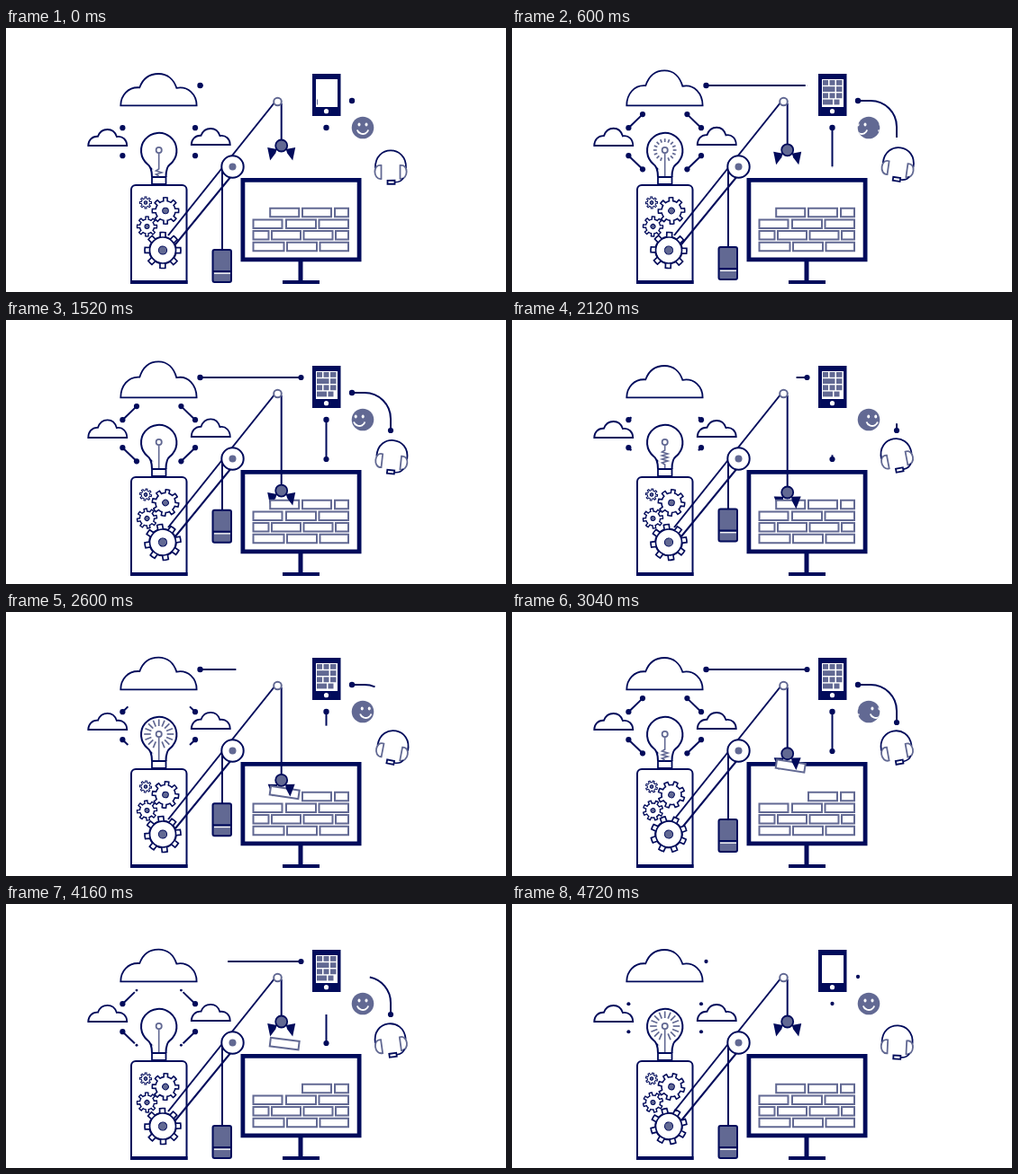
An HTML page with a canvas that plays this animation: 555 by 294 pixels, repeating every 4.76 s.

```html
<!DOCTYPE html>
<html lang="en">
<head>
<meta charset="utf-8">
<title>Idea machine</title>
<style>
  html, body { margin: 0; height: 100%; overflow: hidden; background: #fff; }
  canvas { display: block; }
</style>
</head>
<body>
<canvas id="stage" width="555" height="294"></canvas>
<script>
const c = document.getElementById('stage').getContext('2d');
const NAVY = '#010b5b', SLATE = '#626993', WHITE = '#fff';
const LOOP = 4760, TAU = Math.PI * 2;

const ramp = (t, a, b) => Math.min(1, Math.max(0, (t - a) / (b - a)));
const smooth = (t, a, b) => { const x = ramp(t, a, b); return x * x * (3 - 2 * x); };
const cubic = (t, a, b) => {
  const x = ramp(t, a, b);
  return x < .5 ? 4 * x ** 3 : 1 - 4 * (1 - x) ** 3;
};

function paint(fill, stroke, width = 2) {
  if (fill) { c.fillStyle = fill; c.fill(); }
  if (stroke) { c.strokeStyle = stroke; c.lineWidth = width; c.stroke(); }
}
function line(points, color = NAVY, width = 2) {
  c.beginPath();
  points.forEach(p => c.lineTo(...p));
  paint(null, color, width);
}
function circle(x, y, r, fill, stroke, width) {
  c.beginPath();
  c.arc(x, y, r, 0, TAU);
  paint(fill, stroke, width);
}
function box(x, y, w, h, fill, stroke, width, radius = 0) {
  c.beginPath();
  c.roundRect(x, y, w, h, radius);
  paint(fill, stroke, width);
}
function at(x, y, angle, draw) {
  c.save();
  c.translate(x, y);
  c.rotate(angle);
  draw();
  c.restore();
}

function cloud(x, base, size, puff) {
  const stretch = size * (1 + puff);
  const p = new Path2D();
  p.addPath(new Path2D('M-42 0C-42 -11 -34 -21 -21 -20C-17 -31 -9 -35.3 0 -35.3C10 -35.3 17 -29 20 -19.5C33 -22 42.3 -12 42.3 0Z'),
    new DOMMatrix([size, 0, 0, stretch, x, base]));
  c.strokeStyle = NAVY;
  c.lineWidth = 1.8;
  c.stroke(p);
}

function gear(x, y, body, tip, hub, teeth, angle, width) {
  at(x, y, angle, () => {
    c.beginPath();
    for (let i = 0; i < teeth; i++) {
      const mid = i * TAU / teeth, half = TAU / teeth / 4;
      c.arc(0, 0, body, mid - half * 3, mid - half);
      c.arc(0, 0, tip, mid - half * .75, mid + half * .75);
      c.lineTo(body * Math.cos(mid + half), body * Math.sin(mid + half));
    }
    c.closePath();
    paint(WHITE, NAVY, width);
    if (tip > 18) circle(0, 0, body - .5, null, NAVY, width);
    circle(0, 0, hub, SLATE, NAVY, 1);
  });
}

// Wire drawn between fractions a and b of its length
function wire(points, a, b) {
  if (b <= a) return;
  const [[x0, y0], [x1, y1]] = points;
  const bend = x0 !== x1 && x0 > 380, r = 29;
  const length = bend ? x1 - x0 + y1 - y0 - 2 * r + r * TAU / 4 : Math.hypot(x1 - x0, y1 - y0);
  c.save();
  c.setLineDash([(b - a) * length, 999]);
  c.lineDashOffset = -a * length;
  c.beginPath();
  c.moveTo(x0, y0);
  if (bend) c.arcTo(x1, y0, x1, y1, r);
  c.lineTo(x1, y1);
  paint(null, NAVY, 2);
  c.restore();
}
// Dot that pops in and out within a window of the cycle
function dot([x, y], q, from, to, r = 3.1) {
  const k = Math.min(ramp(q, from, from + .025), 1 - ramp(q, to - .025, to));
  if (k > 0) circle(x, y, r * k, NAVY);
}

function wires(q) {
  const longEnd = smooth(q, -.03, .275), longStart = smooth(q, .64, .955);
  const long = [[[215.5, 64], [327.5, 64]], [[384, 81], [427, 123]], [[355.5, 111], [355.5, 155]]];
  for (const ends of long) {
    wire(ends, longStart, longEnd);
    dot(ends[0], q, -.033, .7, 3.2);
    dot(ends[0], q, .967, 1.7, 3.2);
    dot(ends[1], q, .25, .975);
  }
  const start = smooth(q, .3, .51) - smooth(q, .53, .635);
  const end = smooth(q, 0, .22) - smooth(q, .68, .975);
  for (const sx of [-1, 1]) for (const sy of [-1, 1]) {
    const outer = [169.7 + sx * 40.3, 126.7 + sy * 15.5];
    const inner = [169.7 + sx * 24.7, 126.7 + sy * 30.6];
    wire([outer, inner], start, end);
    dot(outer, q, -.033, .4);
    dot(outer, q, .57, .975);
    dot(outer, q, .967, 1.5);
    dot(inner, q, .18, .76, 3.1 + start);
  }
}

function bulb(p) {
  c.beginPath();
  c.moveTo(162, 166);
  c.bezierCurveTo(162, 158, 160.5, 154, 157, 151.5);
  c.arc(169.7, 136.5, 19.7, Math.PI * .72, Math.PI * .28);
  c.bezierCurveTo(179, 154, 177.5, 158, 177.5, 166);
  paint(WHITE, NAVY);
  box(162, 166, 15.5, 8, WHITE, NAVY, 1.8);

  const k = ramp(p, .17, .27) ** 2;
  const mid = 161 - 24 * k, half = 4 + 17 * k * (1 - k);
  const stem = [];
  for (let y = 139; y <= 165; y += 2) {
    const shaking = p < .27 && Math.abs(y - mid) < half;
    stem.push([169.7 + (shaking ? (y % 4 < 2 ? 3.2 : -3.2) : 0), y]);
  }
  line(stem, SLATE, 1.6);
  circle(169.7, 136, 3.1, WHITE, SLATE, 1.8);

  const glow = ramp(p, .6, .72);
  if (glow) for (let i = 0; i < 16; i++) {
    if (i === 8) continue;
    const a = i * TAU / 16, s = Math.sin(a), o = -Math.cos(a), tip = 9 + 7.5 * Math.sqrt(glow);
    line([[169.7 + 9 * s, 136 + 9 * o], [169.7 + tip * s, 136 + tip * o]], SLATE, 1.7);
  }
}

function phone(p) {
  box(340, 51, 31.5, 47, NAVY);
  box(344, 57, 24, 31, WHITE);
  circle(355.5, 92.7, 2.6, WHITE);
  const tiles = [
    [345, 3, 11], [345, 2, 6], [352.5, 2, 6], [360, 2, 6.5], [345, 1, 13.5], [360, 1, 6.5],
    [345, 0, 6], [352.5, 0, 6], [360, 0, 6.5], [357.5, 3, 6]
  ];
  if (p < .965) tiles.forEach(([x, row, w], i) => {
    const grown = w * ramp(p, i * .03 - .004, i * .03 + .045);
    if (grown) box(x, 58 + row * 7.2, grown, 5.8, SLATE);
  });
}

function face(p) {
  c.save();
  circle(396, 111, 12.3, SLATE);
  c.clip();
  const turn = 25 * smooth(p, .07, .58);
  for (const x of [396 - turn, 421 - turn]) {
    for (const side of [-4, 4]) {
      c.beginPath();
      c.ellipse(x + side, 107.5, 1.5, 2, 0, 0, TAU);
      paint(WHITE);
    }
    c.beginPath();
    c.arc(x, 111.5, 6.5, .1 * Math.PI, .9 * Math.PI);
    paint(null, WHITE, 1.9);
  }
  c.restore();
}

function headset(p) {
  const swing = -Math.sin(p * TAU), lift = Math.abs(swing);
  at(427 + swing * 1.2 + lift, 156 - 4.5 * lift, swing * .19, () => {
    c.beginPath();
    c.moveTo(-17, 0);
    c.bezierCurveTo(-18, -26, 18, -26, 17, 0);
    paint(null, NAVY, 1.8);
    for (const s of [-1, 1]) {
      c.beginPath();
      c.moveTo(s * 10.5, -3);
      c.bezierCurveTo(s * 20, -5, s * 20, 13, s * 10.5, 12);
      c.closePath();
      paint(WHITE, SLATE, 1.8);
    }
    c.beginPath();
    c.moveTo(14, 11);
    c.quadraticCurveTo(12, 15.5, 5, 15.8);
    paint(null, NAVY, 1.6);
    box(-3.5, 13.8, 8, 4, WHITE, NAVY, 1.8);
  });
}

const brick = (x, y, w) => box(x, y, w, 9.5, WHITE, SLATE, 2);

function monitor() {
  line([[327, 259], [327, 283]], NAVY, 5);
  line([[307, 283], [348, 283]], NAVY, 4);
  box(262.9, 169.4, 129.2, 88.4, WHITE, NAVY, 4.8);
  const rows = [
    [[329, 32], [365, 15]],
    [[274.5, 32], [311, 33], [347.5, 32.5]],
    [[274.5, 17], [295, 32], [330.5, 32], [366, 14]],
    [[274.5, 34], [312, 33], [348.5, 31.5]]
  ];
  rows.forEach((row, i) => row.forEach(([x, w]) => brick(x, 200.7 + i * 12.7, w)));
}

function crane(t) {
  const drop = cubic(t, 130, 1870) - cubic(t, 2134, 3874);
  const y = 131 + 61 * drop, weight = 247 - 36.5 * drop;

  line([[180, 231], [298.5, 82.5]]);
  line([[188, 241], [250, 165]]);
  line([[240, 157], [240, weight]]);
  box(229.5, weight, 20.5, 36, SLATE, NAVY, 2, 2);
  line([[230, weight + 24], [250, weight + 24]], NAVY, 2);
  line([[231, weight + 26.2], [249, weight + 26.2]], WHITE, 1.3);
  circle(251.5, 154.5, 12.2, WHITE, NAVY);
  circle(251.5, 154.5, 4, SLATE);

  line([[305.7, 84], [305.7, y]]);
  circle(301.5, 82, 4.3, WHITE, SLATE);

  const grip = smooth(t, 1900, 2110) - smooth(t, 3960, 4100);
  const prong = side => at(305.7, y, side * grip * .16, () => {
    c.beginPath();
    c.moveTo(side * 5, 4);
    c.lineTo(side * 15.5, 2);
    c.lineTo(side * 12.5, 16.5);
    c.lineTo(side * 6.5, 8.5);
    paint(NAVY);
  });
  const fall = ramp(t, 4000, 4380) ** 2;
  const tilt = .15 * smooth(t, 2134, 2600) * (1 - fall);
  const held = t > 2134 ? y + 13.8 : 205.5;
  prong(-1);
  at(309.5, held + (205.5 - held) * fall, tilt, () => brick(-16.3, -4.8, 32));
  prong(1);
  circle(305.7, y, 6.5, SLATE, NAVY, 1.8);
}

function draw(t) {
  const p = t / 952 % 1, q = t / 2380 % 1, r = t * 3 / LOOP % 1, turn = p * TAU;
  c.fillStyle = WHITE;
  c.fillRect(0, 0, 555, 294);

  const puff = Math.cos(Math.PI / 2 * Math.min(1, Math.abs(p - .55) / .22)) ** 2;
  cloud(169.3, 86.3, 1, puff * .15);
  cloud(112.7, 131, .51, puff * .1);
  cloud(227.2, 130, .51, puff * .1);
  wires(q);
  phone(r);
  face(t / 476 % 1);
  headset(p);

  bulb(p);
  box(139, 175, 61.5, 109, WHITE, NAVY, 2, [5, 5, 0, 0]);
  line([[138, 283], [201.5, 283]], NAVY, 4);
  gear(155, 194.5, 4.7, 6.6, 1.8, 8, -turn, 1);
  gear(177, 203.5, 11, 14.7, 3.3, 8, -turn, 1.6);
  gear(156.5, 221, 8, 11, 2.5, 8, turn, 1.4);
  monitor();
  crane(t);
  gear(174, 247.5, 15, 20, 4.6, 8, turn, 1.7);
}

function tick() {
  draw(performance.now() % LOOP);
  requestAnimationFrame(tick);
}
tick();
</script>
</body>
</html>
```
